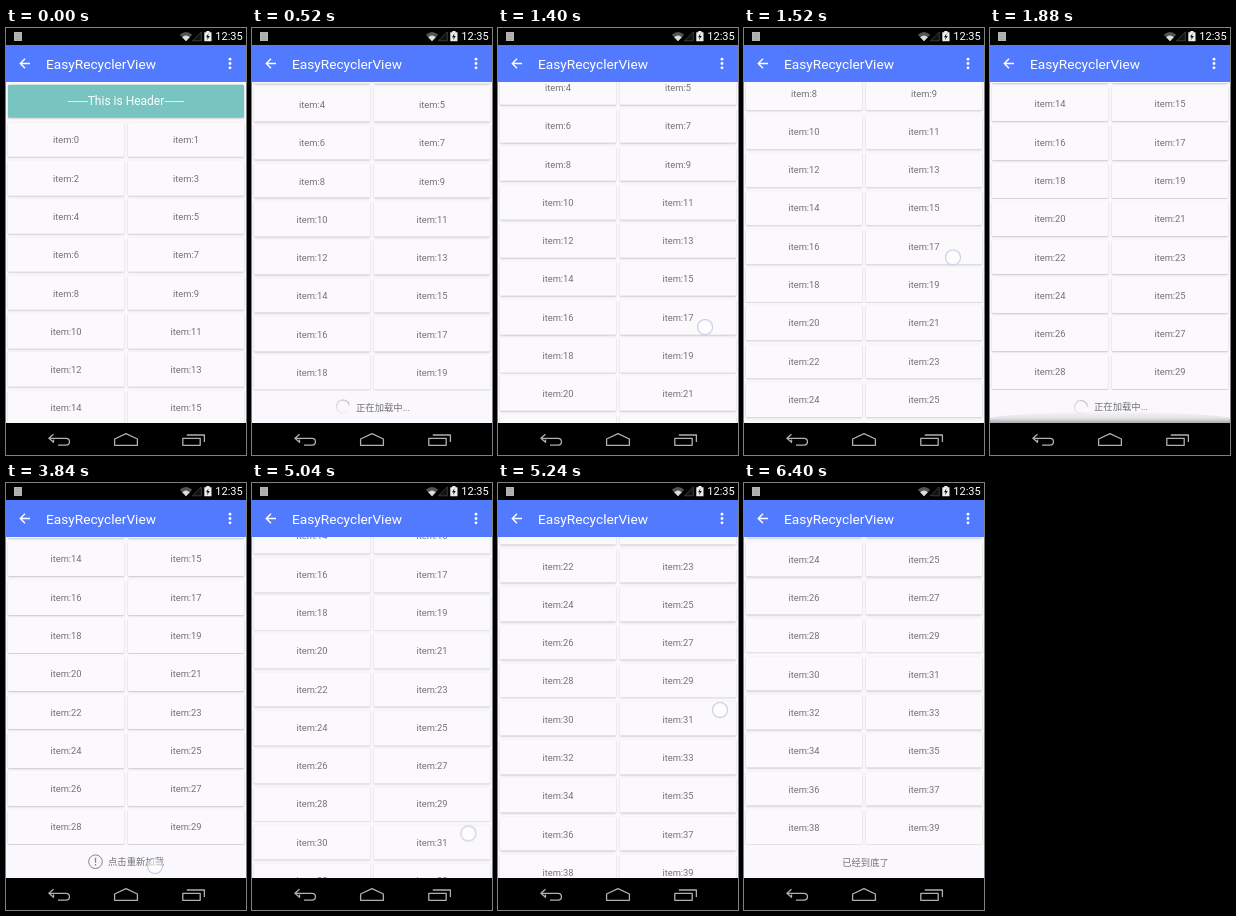
These frames come from a looping animation (240 px wide and 427 px high, 7.98 s). An HTML page:

```html
<!DOCTYPE html>
<html lang="zh-CN">
<head>
<meta charset="utf-8">
<title>EasyRecyclerView</title>
<style>
:root { --loop: 7980ms; --page: #faf8fc; }
html, body { margin: 0; width: 100%; height: 100%; overflow: hidden; background: #000; }
body { position: relative; font-family: Roboto, "Noto Sans CJK SC", "Noto Sans CJK", sans-serif; }
.stage { position: absolute; left: 0; top: 0; width: 240px; height: 427px; overflow: hidden; }
.stage svg { position: absolute; left: 0; top: 0; }

.view { position: absolute; top: 54px; width: 240px; height: 341px; overflow: hidden; background: var(--page); }
.list { padding-top: .01px; animation: scroll var(--loop) linear infinite; }
.card, .header {
  display: flex; align-items: center; justify-content: center;
  border-radius: 1.2px; box-shadow: 0 .9px 2px rgba(0, 0, 0, .21);
}
.header { height: 33px; margin: 2.7px 1.6px 2.3px; background: #78c4c1; color: #fff; font-size: 12px; }
.header i { position: relative; top: -.8px; font: 10px "Liberation Sans", sans-serif; }
.batch { position: relative; display: grid; grid-template-columns: 120px 120px; background: var(--page); }
.card { height: 34.6px; margin: 2.7px 1.6px 1px; background: #fbf9fc; color: #727174; font-size: 9.33px; }
.footer { position: relative; height: 33.3px; margin-bottom: -33.3px; color: #707070; font-size: 9.33px; }
.footer div { position: absolute; inset: 0; background: var(--page); line-height: 33.3px; }
.footer span { position: absolute; }
.spinner {
  left: 84px; top: 9.7px; width: 14px; height: 14px; border-radius: 50%;
  background: conic-gradient(from -61deg, rgba(120, 120, 120, 0) 10%, rgba(120, 120, 120, .85));
  -webkit-mask: radial-gradient(circle, transparent 5.7px, #000 6.2px);
  mask: radial-gradient(circle, transparent 5.7px, #000 6.2px);
  animation: spin 1330ms linear infinite;
}
.second { animation: second var(--loop) step-end infinite; }
.third { animation: third var(--loop) step-end infinite; }
.error { animation: error var(--loop) step-end infinite; }
.end { text-align: center; text-indent: 3px; animation: end var(--loop) step-end infinite; }

.glow {
  position: absolute; left: -20px; bottom: 0; width: 280px; height: 20px; transform-origin: bottom;
  border-radius: 50% 50% 0 0 / 100% 100% 0 0;
  background: linear-gradient(to top, rgba(60, 64, 64, .6), rgba(130, 130, 135, .25) 45%, rgba(160, 160, 165, .08));
  animation: glow var(--loop) linear infinite;
}
.touch {
  position: absolute; left: -8px; top: -8px; width: 14px; height: 14px; border-radius: 50%;
  border: 1px solid rgba(165, 175, 220, .7); background: rgba(255, 255, 255, .6);
  animation: drag var(--loop) linear infinite, press var(--loop) step-end infinite;
}
.bar { position: absolute; top: 16.7px; width: 240px; height: 37.3px; background: #527aff; }
.bar b { position: absolute; left: 40px; line-height: 38.6px; font-size: 13.7px; font-weight: 400; color: #fff; }
.status, .nav { position: absolute; width: 240px; background: #000; }
.status { top: 0; height: 16.7px; }
.nav { top: 395px; height: 32px; }
.clock { position: absolute; left: 209.3px; line-height: 18px; font-size: 11px; color: #fff; }

@keyframes spin { to { transform: rotate(360deg); } }
@keyframes scroll {
  0%, .5% { transform: translateY(-.3px); }
  2.506% { transform: translateY(-30px); }
  4.511% { transform: translateY(-90px); }
  6.015%, 17.043% { transform: translateY(-112.5px); }
  18.045% { transform: translateY(-145px); }
  19.048% { transform: translateY(-198.5px); }
  20.05%, 62.657% { transform: translateY(-304px); }
  64.16% { transform: translateY(-370px); }
  65.664% { transform: translateY(-450px); }
  67.168%, 100% { transform: translateY(-495.5px); }
}
@keyframes second { 0% { visibility: hidden; } 16.28%, 100% { visibility: visible; } }
@keyframes third { 0% { visibility: hidden; } 62.15%, 100% { visibility: visible; } }
@keyframes error {
  0%, 49.12%, 100% { visibility: hidden; }
  34.58% { visibility: visible; }
}
@keyframes end { 0% { visibility: hidden; } 80.19%, 100% { visibility: visible; } }
@keyframes glow {
  0%, 20.05% { transform: scaleY(0); opacity: 0; }
  21.554% { transform: scaleY(1); opacity: .8; }
  23.559% { transform: scaleY(.55); opacity: .7; }
  29.07%, 67.669% { transform: scaleY(0); opacity: 0; }
  69.173% { transform: scaleY(1); opacity: .8; }
  71.178% { transform: scaleY(.55); opacity: .7; }
  77.69%, 100% { transform: scaleY(0); opacity: 0; }
}
@keyframes drag {
  0%, .5% { transform: translate(204px, 320px); }
  2.506% { transform: translate(206px, 290px); }
  4.511% { transform: translate(208px, 230px); }
  4.52%, 17.043% { transform: translate(206px, 316px); }
  18.045% { transform: translate(208px, 283px); }
  19.048%, 19.6% { transform: translate(209px, 229.5px); }
  19.61%, 49.12% { transform: translate(149px, 383px); }
  49.13%, 62.657% { transform: translate(215px, 373px); }
  64.16% { transform: translate(219px, 307px); }
  65.664%, 100% { transform: translate(222px, 227px); }
}
@keyframes press {
  0%, 4.4%, 19.5%, 49.12%, 66.1%, 100% { opacity: 0; }
  .9%, 17.04%, 48.11%, 62.65% { opacity: 1; }
}
</style>
</head>
<body>
<div class="stage">
  <div class="view">
    <div class="list">
      <div class="header"><i>——</i>This is Header<i>——</i></div>
      <div class="batch" data-from="0" data-to="20"></div>
      <div class="footer"><div class="loading"></div></div>
      <div class="batch second" data-from="20" data-to="30"></div>
      <div class="footer">
        <div class="loading"></div>
        <div class="error">
          <svg width="100" height="33" fill="none" stroke="#858585"><circle cx="89.5" cy="16.7" r="6.8"/><path d="M89.5 12.7v5M89.5 19v1.4" stroke-width="1.3"/></svg>
          <span style="left:102px">点击重新加载</span>
        </div>
      </div>
      <div class="batch third" data-from="30" data-to="40"></div>
      <div class="footer">
        <div class="loading"></div>
        <div class="end">已经到底了</div>
      </div>
    </div>
    <div class="glow"></div>
  </div>

  <div class="bar"><b>EasyRecyclerView</b></div>
  <div class="status"><span class="clock">12:35</span></div>
  <div class="nav"></div>
  <svg width="240" height="427" fill="none">
    <path d="M24 35.5H14.5M19 30.8L14.3 35.5L19 40.2" stroke="#fff" stroke-width="1.4"/>
    <g fill="#fff"><circle cx="224" cy="31.2" r="1.4"/><circle cx="224" cy="35.5" r="1.4"/><circle cx="224" cy="39.8" r="1.4"/></g>
    <path d="M8 4h8v9H8z" fill="#b5b5b5"/>
    <path d="M9.5 6h5M9.5 8.5h5M9.5 11h5" stroke="#999" stroke-width=".7"/>
    <path d="M173.8 6.7Q180 1.4 186.2 6.7L180 13.2z" fill="#555"/>
    <path d="M176.2 9.2Q180 6 183.8 9.2L180 13.2z" fill="#ddd"/>
    <path d="M195.3 4v8.8h-8.8z" fill="#111" stroke="#505050" stroke-width=".7"/>
    <path d="M198.3 4.2h2v-1.2h3.2v1.2h2v9h-7.2z" fill="#eee"/>
    <path d="M202.6 5.3l-2.6 4h1.7l-.7 3 2.8-4.2h-1.8z" fill="#111"/>
    <g stroke="#b0b0b0" stroke-width="1.3" stroke-linejoin="round">
      <path d="M47.5 406.3l-4.6 4 4.6 4v-2.7M43.5 410.3h16.5c4.6 0 4.6 6.9 0 6.9h-8"/>
      <path d="M108.6 411L120 405.7l11.4 5.3v6.3h-22.8z"/>
      <path d="M176.8 410.3h17.4v7h-17.4zM180.8 407h17.6v7"/>
    </g>
  </svg>
  <div class="touch"></div>
</div>
<script>
for (const batch of document.querySelectorAll(".batch")) {
  for (let i = +batch.dataset.from; i < +batch.dataset.to; i++) {
    const card = document.createElement("div");
    card.className = "card";
    card.textContent = "item:" + i;
    batch.append(card);
  }
}
for (const panel of document.querySelectorAll(".loading")) {
  panel.innerHTML = '<span class="spinner"></span><span style="left:104px">正在加载中...</span>';
}
</script>
</body>
</html>
```
